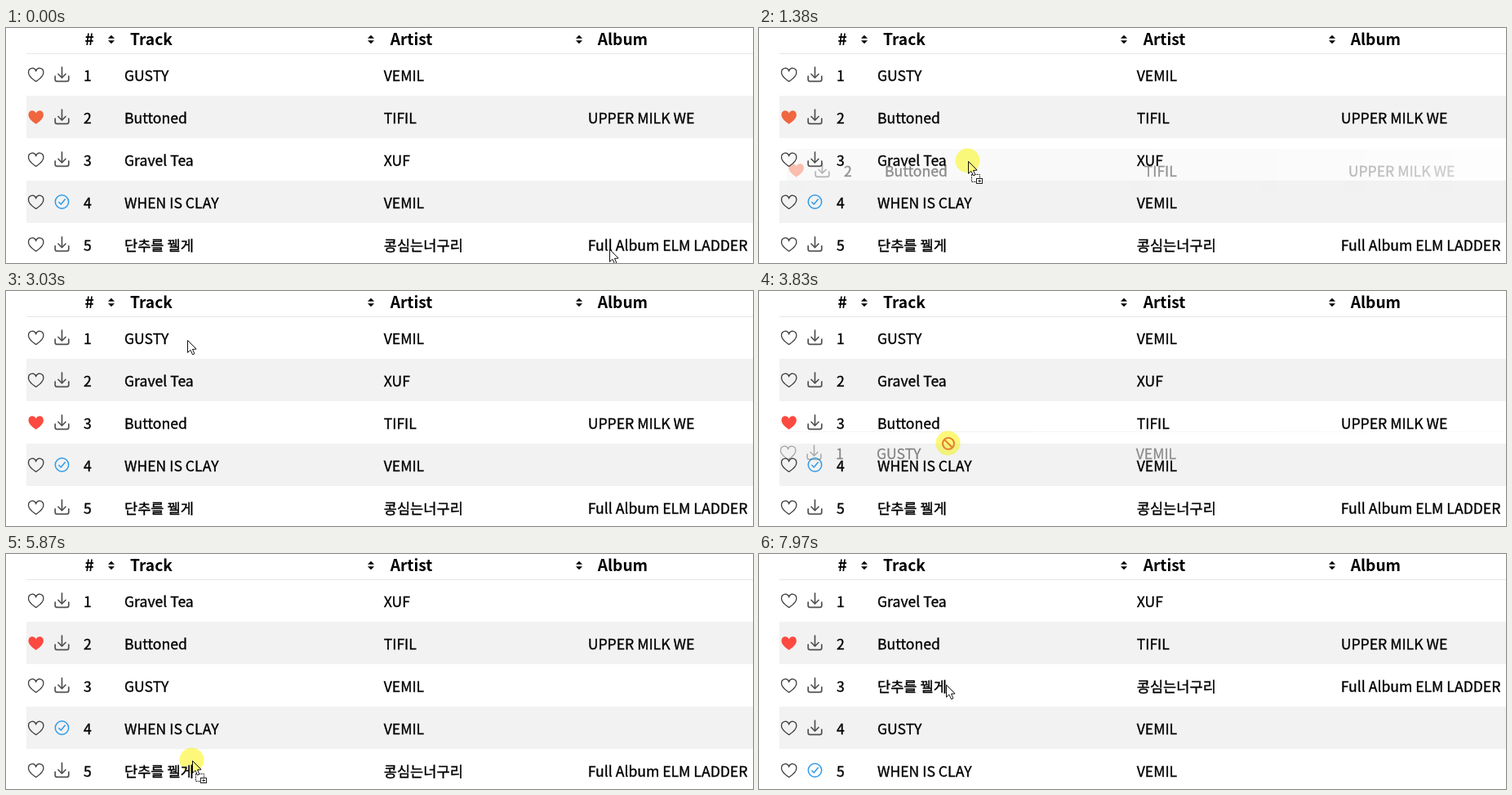
These frames come from a looping animation (915x288 px, 7.99 s). An HTML page with a canvas:

```html
<!DOCTYPE html>
<html lang="ko">
<head>
<meta charset="utf-8">
<title>Playlist reordering</title>
<style>
  html, body { margin: 0; width: 100%; height: 100%; overflow: hidden; background: #fff; }
  canvas { display: block; width: 915px; height: 288px; }
</style>
</head>
<body>
<canvas id="stage" width="915" height="288"></canvas>
<script>
const W = 915, H = 288, LOOP = 7990;
const LEFT = 25, TOP = 31, ROW = 52;
const FAMILY = '"Noto Sans CJK KR", "Noto Sans KR", "Noto Sans", sans-serif';
const BODY_FONT = `500 17.6px ${FAMILY}`;
const HEAD_FONT = `700 19.2px ${FAMILY}`;
const ctx = document.getElementById('stage').getContext('2d');

const gusty = { track: 'GUSTY', artist: 'VEMIL' };
const buttoned = { track: 'Buttoned', artist: 'TIFIL', album: 'UPPER MILK WE', liked: true };
const gravel = { track: 'Gravel Tea', artist: 'XUF' };
const clay = { track: 'WHEN IS CLAY', artist: 'VEMIL', saved: true };
const thread = { track: '단추를 꿸게', artist: '콩심는너구리', album: 'Full Album ELM LADDER' };

// Row order from each time on
const orders = [
  [0, [gusty, buttoned, gravel, clay, thread]],
  [2050, [gusty, gravel, buttoned, clay, thread]],
  [4880, [gravel, buttoned, gusty, clay, thread]],
  [7370, [gravel, buttoned, thread, gusty, clay]],
];

const drags = [
  { row: 1, press: 660, show: 860, drop: 2050, x: 247, y: 98 },
  { row: 0, press: 3180, show: 3330, drop: 4880, x: 233, y: 46 },
  { row: 4, press: 5700, show: 5930, drop: 7370, x: 225, y: 266 },
];

// Pointer path: time, x, y
const path = [
  [0, 739, 271], [20, 739, 271], [490, 238, 105], [640, 238, 105],
  [760, 247, 98], [1380, 256, 163], [1440, 256, 167], [1880, 250, 190],
  [2200, 250, 190], [2840, 226, 102], [3030, 222, 60], [3160, 233, 46],
  [3250, 233, 47], [3650, 232, 168], [3830, 232, 187], [4150, 232, 190],
  [4430, 232, 190], [4560, 232, 178], [4880, 232, 178], [5660, 225, 266],
  [5720, 225, 266], [5870, 228, 253], [6480, 230, 127], [6700, 230, 127],
  [6880, 230, 143], [7060, 230, 143], [7200, 229, 134], [7920, 229, 134],
  [7970, 229, 160], [LOOP, 229, 160],
];

function slope(i, axis) {
  const a = path[i - 1], b = path[i], c = path[i + 1];
  if (!a || !c || (c[axis] - b[axis]) * (b[axis] - a[axis]) <= 0) return 0;
  return (c[axis] - a[axis]) / (c[0] - a[0]);
}

function pointerAt(t) {
  let i = 0;
  while (i < path.length - 2 && path[i + 1][0] <= t) i++;
  const a = path[i], b = path[i + 1], span = b[0] - a[0];
  const u = (t - a[0]) / span, v = 1 - u;
  const [x, y] = [1, 2].map(k =>
    a[k] * v * v * (1 + 2 * u) + b[k] * u * u * (3 - 2 * u) +
    span * u * v * (slope(i, k) * v - slope(i + 1, k) * u));
  return { x: Math.round(x), y: Math.round(y) };
}

function orderAt(t) {
  return orders.filter(([start]) => start <= t).pop()[1];
}

function widthIn(font) {
  ctx.font = font;
  return ctx.measureText('GUSTY').width;
}
// Thicken slightly when the family has no medium weight
const needsWeight = widthIn(BODY_FONT) === widthIn(BODY_FONT.replace('500', '400'));

function label(c, str, x, y) {
  c.fillText(str, x, y);
  if (needsWeight) c.strokeText(str, x, y);
}

function polygon(c, points) {
  c.beginPath();
  points.forEach(([x, y]) => c.lineTo(x, y));
  c.closePath();
}

function polyline(c, ...points) {
  c.beginPath();
  points.forEach(([x, y]) => c.lineTo(x, y));
  c.stroke();
}

function heart(c, x, y, fill) {
  c.save();
  c.translate(x, y);
  c.beginPath();
  c.moveTo(0, 8.4);
  c.bezierCurveTo(-2, 6.8, -9.2, 2.6, -9.2, -2.8);
  c.bezierCurveTo(-9.2, -9, -2, -9.8, 0, -4.8);
  c.bezierCurveTo(2, -9.8, 9.2, -9, 9.2, -2.8);
  c.bezierCurveTo(9.2, 2.6, 2, 6.8, 0, 8.4);
  c.lineWidth = 1.3;
  c.fillStyle = c.strokeStyle = fill || '#3c3c3c';
  if (fill) c.fill(); else c.stroke();
  c.restore();
}

function downloadIcon(c, x, y) {
  c.save();
  c.translate(x, y);
  c.strokeStyle = '#505050';
  c.lineWidth = 1.7;
  c.lineCap = c.lineJoin = 'round';
  polyline(c, [0, -9], [0, 3.5]);
  polyline(c, [-4.5, -0.5], [0, 4], [4.5, -0.5]);
  c.beginPath();
  c.moveTo(-8.3, 2);
  c.lineTo(-8.3, 6);
  c.quadraticCurveTo(-8.3, 8.4, -6, 8.4);
  c.lineTo(6, 8.4);
  c.quadraticCurveTo(8.3, 8.4, 8.3, 6);
  c.lineTo(8.3, 2);
  c.stroke();
  c.restore();
}

function checkIcon(c, x, y) {
  c.save();
  c.translate(x, y);
  c.strokeStyle = '#2f9be8';
  c.lineWidth = 1.5;
  c.lineCap = c.lineJoin = 'round';
  c.beginPath();
  c.arc(0, 0, 8.2, 0, Math.PI * 2);
  c.stroke();
  polyline(c, [-3.7, 0.5], [-1.2, 3], [3.8, -3]);
  c.restore();
}

function drawRow(c, song, index, t) {
  const y = TOP + ROW * index;
  c.fillStyle = index % 2 ? '#f2f2f2' : '#fff';
  c.fillRect(LEFT, y, W - LEFT, ROW);
  if (index === 0) {
    c.fillStyle = '#e6e6e6';
    c.fillRect(LEFT, y, W - LEFT, 1);
  }
  const red = t < 2050 ? '#f0663f' : '#fd4a40';
  heart(c, 36.7, y + 26.3, song.liked && red);
  (song.saved ? checkIcon : downloadIcon)(c, 68.5, y + 26);
  c.font = BODY_FONT;
  c.fillStyle = c.strokeStyle = '#000';
  c.lineWidth = 0.35;
  const base = y + 34;
  label(c, String(index + 1), 95, base);
  label(c, song.track, 145, base);
  label(c, song.artist, 462.7, base);
  if (song.album) label(c, song.album, 712.7, base);
}

function drawHeader() {
  ctx.fillStyle = '#000';
  ctx.font = HEAD_FONT;
  [['#', 96.6], ['Track', 152], ['Artist', 470.7], ['Album', 724.7]]
    .forEach(([str, x]) => ctx.fillText(str, x, 21));
  for (const x of [129, 447, 702]) {
    for (const s of [-1, 1]) {
      polygon(ctx, [[x - 4, 14 + s * 1.2], [x + 4, 14 + s * 1.2], [x, 14 + s * 5.2]]);
      ctx.fill();
    }
  }
}

// Lay something over the table without lightening what is below
function darken(paint) {
  ctx.globalCompositeOperation = 'darken';
  paint();
  ctx.globalCompositeOperation = 'source-over';
}

const ghostCanvas = document.createElement('canvas');
ghostCanvas.width = W;
ghostCanvas.height = H;
const ghost = ghostCanvas.getContext('2d');

function drawGhost(drag, pos, t) {
  ghost.clearRect(0, 0, W, H);
  drawRow(ghost, orderAt(t)[drag.row], drag.row, t);
  const fade = ghost.createLinearGradient(0, 0, W, 0);
  fade.addColorStop(0, 'rgba(0,0,0,.42)');
  fade.addColorStop(0.3, 'rgba(0,0,0,.48)');
  fade.addColorStop(0.6, 'rgba(0,0,0,.4)');
  fade.addColorStop(1, 'rgba(0,0,0,.14)');
  ghost.globalCompositeOperation = 'destination-in';
  ghost.fillStyle = fade;
  ghost.fillRect(0, 0, W, H);
  ghost.globalCompositeOperation = 'source-over';
  darken(() => ctx.drawImage(ghostCanvas, pos.x - drag.x, pos.y - drag.y));
}

function highlight({ x, y }) {
  darken(() => {
    ctx.fillStyle = '#fef87a';
    ctx.beginPath();
    ctx.arc(x - 0.5, y - 0.5, 15, 0, Math.PI * 2);
    ctx.fill();
  });
}

function arrow({ x, y }) {
  ctx.save();
  ctx.translate(x + 0.5, y + 0.5);
  polygon(ctx, [[0, 0], [0, 15], [3.4, 11.8], [6, 17.4], [8.4, 16.4], [6, 11], [10.6, 10.6]]);
  ctx.fillStyle = '#fff';
  ctx.strokeStyle = '#111';
  ctx.lineWidth = 1;
  ctx.fill();
  ctx.stroke();
  ctx.restore();
}

function copyBadge({ x, y }) {
  ctx.save();
  ctx.translate(x + 0.5, y + 0.5);
  ctx.strokeStyle = '#222';
  ctx.lineWidth = 1;
  ctx.setLineDash([2, 1]);
  ctx.strokeRect(4, 16, 10, 9);
  ctx.setLineDash([]);
  ctx.fillStyle = '#fff';
  ctx.fillRect(10, 21, 7, 6);
  ctx.strokeRect(10, 21, 7, 6);
  polyline(ctx, [12, 24], [15.5, 24]);
  polyline(ctx, [13.5, 22.2], [13.5, 25.8]);
  ctx.restore();
}

function forbidden({ x, y }) {
  ctx.strokeStyle = '#e5851c';
  ctx.lineWidth = 2.2;
  ctx.beginPath();
  ctx.arc(x, y, 7, 0, Math.PI * 2);
  ctx.stroke();
  polyline(ctx, [x - 5, y - 5], [x + 5, y + 5]);
}

function drawPointer(t, pos, drag) {
  if (t >= 3780 && t < 3900) return forbidden(pos);
  if (drag && t >= drag.press + 120) copyBadge(pos);
  arrow(pos);
}

function draw(t) {
  const pos = pointerAt(t);
  const drag = drags.find(d => t >= d.press && t < d.drop);
  ctx.fillStyle = '#fff';
  ctx.fillRect(0, 0, W, H);
  orderAt(t).forEach((song, i) => drawRow(ctx, song, i, t));
  drawHeader();
  if (drag && t >= drag.show) drawGhost(drag, pos, t);
  drawPointer(t, pos, drag);
  if (drag) highlight(pos);
}

const start = performance.now();
function tick() {
  draw((performance.now() - start) % LOOP);
  requestAnimationFrame(tick);
}
tick();
</script>
</body>
</html>
```
